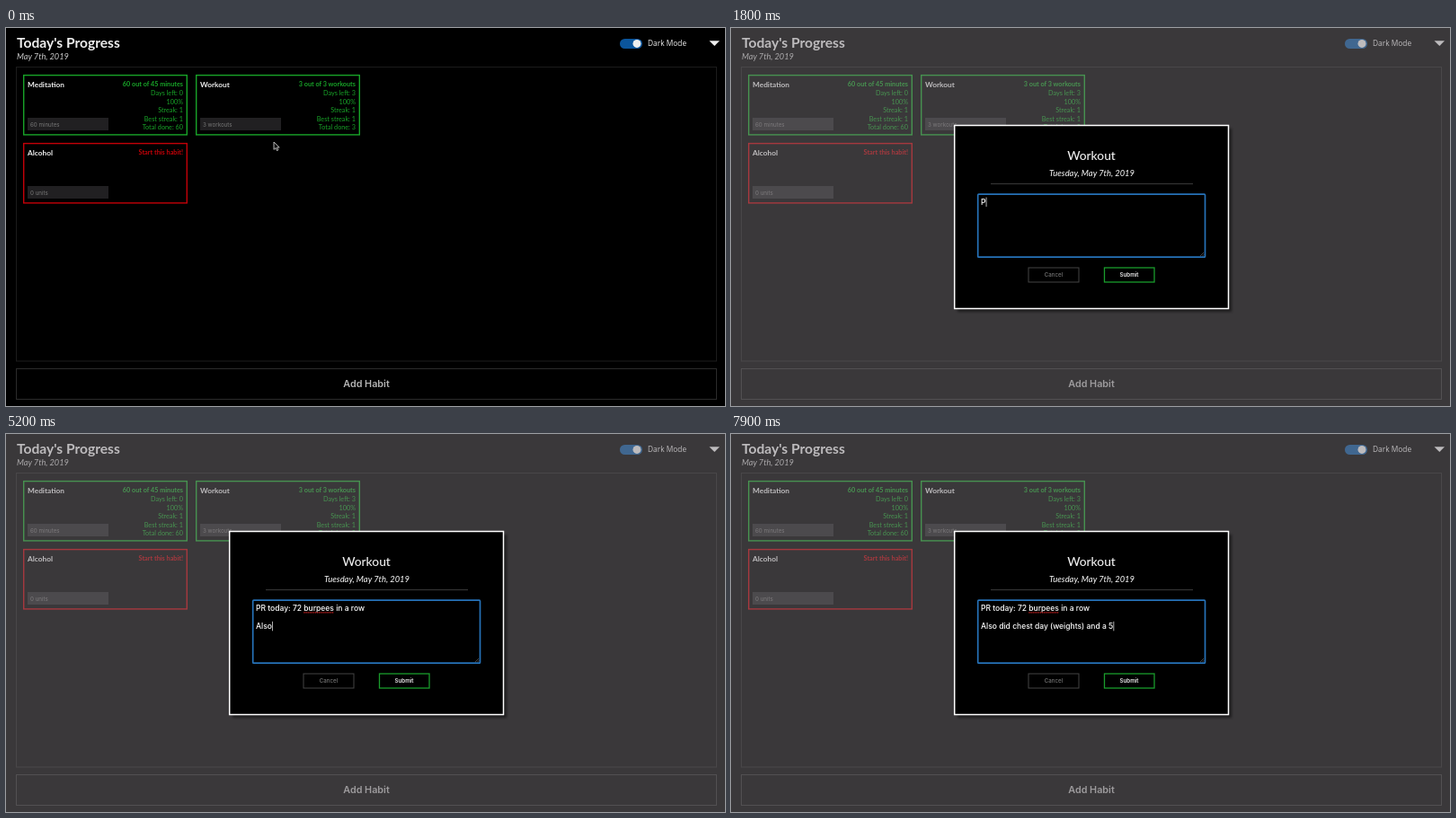
Recreate the animation shown at these times as an HTML page. Size 800 px wide and 421 px high, loop 8000 ms.

```html
<!DOCTYPE html>
<html lang="en">
<head>
<meta charset="utf-8">
<title>Habit tracker</title>
<style>
  html, body { margin: 0; width: 100%; height: 100%; overflow: hidden; background: #000; }
  svg { display: block; width: 800px; height: 421px; }
  text { font-family: Lato, sans-serif; fill: #eee; white-space: pre; }
  rect { fill: none; }
  .ui { font-family: Inter, sans-serif; font-size: 6.2px; }
  .mid { text-anchor: middle; }
  .bold { font-weight: 700; }
  .it { font-style: italic; }
  .name { font-size: 8.3px; font-weight: 700; }
  .stat { font-size: 7.25px; text-anchor: end; }
  .note { font: 500 8.53px Inter, sans-serif; fill: #fff; }
  .frame { stroke: #1c1c1c; }
  .item { fill: #000; stroke: #303030; stroke-width: .8; }
</style>
</head>
<body>
<svg viewBox="0 0 800 421">
  <rect width="800" height="421" style="fill:#000"/>
  <text class="bold" x="12" y="21.5" font-size="15.6">Today's Progress</text>
  <text class="it" x="12" y="35" font-size="9.2" style="fill:#ccc">May 7th, 2019</text>
  <rect x="683" y="12" width="25" height="11" rx="5.5" style="fill:#0b559c"/>
  <circle cx="702" cy="17.4" r="4.5" fill="#eee"/>
  <text x="714" y="20.3" style="font:8.4px 'Open Sans',sans-serif">Dark Mode</text>
  <path d="M782.5 14.3h11.5l-5.7 5.7z" fill="#eee"/>
  <rect class="frame" x="11.5" y="43.5" width="779" height="327.5"/>
  <rect class="frame" x="11.5" y="379.5" width="779" height="34" style="stroke:#2b2b2b"/>
  <text class="mid" x="401" y="400.2" style="font:600 10.8px Inter,sans-serif;fill:#b4b4b4">Add Habit</text>
  <g id="cards"></g>
  <path id="arrow" d="M254 59.5h8.5l-4.2 4.5z" fill="#fff"/>
  <g id="menu"></g>

  <g id="dialog">
    <rect width="800" height="421" style="fill:rgba(128,124,128,.45)"/>
    <g id="modal">
      <rect class="box" x="252" y="4" width="305" style="fill:#000;opacity:.5;filter:blur(1.5px)"/>
      <rect class="box" x="248.7" y=".5" width="304.8" style="fill:#000;stroke:#fff;stroke-width:1.5"/>
      <text class="mid" x="401" y="39" font-size="13.8" font-weight="500">Workout</text>
      <text class="mid it" x="401.5" y="57" font-size="9.4" font-weight="500">Tuesday, May 7th, 2019</text>
      <path d="M289 65.6h225" stroke="#3c3c3c"/>
      <rect x="274.7" y="77.2" width="252.8" height="70" rx="1" style="stroke:#2672b8;stroke-width:1.7"/>
      <path d="M522 146l4-4m-1.500 4l2-2" stroke="#777" stroke-width=".6"/>
      <text id="hint" class="note" x="278" y="89" style="fill:#6b6b6b;font-weight:400">Add a note for today...</text>
      <g id="lines"></g>
      <path id="typo" stroke="#d22" stroke-width="1.1" stroke-dasharray="1.3 .8"/>
      <path id="caret" d="M0 0v10.5" stroke="#ddd" stroke-width=".8"/>
      <g id="buttons">
        <rect x="331" y="159" width="56" height="16" style="stroke:#444"/>
        <text class="ui mid" x="359" y="169.300" style="fill:#888">Cancel</text>
        <rect x="415.5" y="159" width="55.5" height="16" style="stroke:#1a9c2c;stroke-width:1.3"/>
        <text class="ui mid" x="443" y="169.300" font-weight="600">Submit</text>
      </g>
    </g>
  </g>

  <path id="pointer" d="M0 0v8.400l2-1.800 1.400 3 1.500-.7-1.400-2.900h2.700z" fill="#111" stroke="#ddd" stroke-width=".8"/>
  <path id="hand" d="M-.8.5q.9-1.200 1.700 0l.5 3 3.200.8q.9.4.7 1.600l-.8 3.300h-3.800l-3-3.700q0-1.400 1.500-.6l.6.6z" fill="#fff" stroke="#222" stroke-width=".6"/>
</svg>
<script>
const $ = id => document.getElementById(id);
const show = (el, on) => el.setAttribute('display', on ? 'inline' : 'none');
const place = (el, x, y) => el.setAttribute('transform', `translate(${x} ${y})`);

function card(x, y, name, value, color, stats) {
  return `<rect x="${x + .7}" y="${y + .6}" width="181.600" height="66.300" style="stroke:${color};stroke-width:1.4"/>
    <text class="name" x="${x + 5}" y="${y + 13.8}">${name}</text>
    <rect x="${x + 5}" y="${y + 48}" width="90" height="14" style="fill:#212022"/>
    <text class="ui" x="${x + 8}" y="${y + 57.6}" style="fill:#777">${value}</text>` +
    stats.map((s, i) => `<text class="stat ${i ? '' : 'bold'}" x="${x + 178}"
      y="${y + 13.3 + i * 9.6}" style="fill:${color}">${s}</text>`).join('');
}
const stats = (head, left, total) =>
  [head, `Days left: ${left}`, '100%', 'Streak: 1', 'Best streak: 1', `Total done: ${total}`];

$('cards').innerHTML =
  card(19, 52, 'Meditation', '60 minutes', '#18a428', stats('60 out of 45 minutes', 0, 60)) +
  card(211, 52, 'Workout', '3 workouts', '#18a428', stats('3 out of 3 workouts', 3, 3)) +
  card(19, 128, 'Alcohol', '0 units', '#c40008', ['Start this habit!']);

$('menu').innerHTML = ['Suspend', 'Edit Goal', 'Add Note'].map((label, i) =>
  `<rect class="item" x="253.5" y="${66.5 + i * 13}" width="52.500" height="13"/>
   <text class="ui mid" x="279.800" y="${75.2 + i * 13}">${label}</text>`).join('') +
  `<g id="focus"><rect x="253.900" y="92" width="51.800" height="13.500" rx="1.500"
     style="fill:#000;stroke:#2672b8;stroke-width:1.8"/>
   <text class="ui mid bold" x="279.800" y="101.200">Add Note</text></g>`;

$('lines').innerHTML = [0, 1, 2].map(i =>
  `<text class="note" x="278" y="${89 + i * 10.1}"></text>`).join('');
const lines = [...$('lines').children];

const note = 'PR today: 72 burpees in a row\n\nAlso did chest day (weights) and a 5';
const typing = [[1600, 0], [1700, 1], [1800, 1], [2500, 10], [2700, 10], [2800, 12], [3600, 23],
  [4500, 29], [4700, 31], [4900, 31], [5000, 32], [5200, 35], [5800, 39], [6200, 46],
  [6700, 50], [6800, 50], [7700, 65], [7900, 67]];
const mouse = [[0, 298, 127], [100, 298, 127], [500, 259, 62], [700, 259, 62],
  [1000, 285, 92], [1200, 292, 101]];

// Linear interpolation through [time, value] points.
function along(points, t, k = 1) {
  const i = points.findIndex(p => p[0] >= t);
  if (i < 0) return points[points.length - 1][k];
  if (!i) return points[0][k];
  const a = points[i - 1], b = points[i];
  return a[k] + (b[k] - a[k]) * (t - a[0]) / (b[0] - a[0]);
}

function draw(t) {
  const x = along(mouse, t), y = along(mouse, t, 2);
  const open = t >= 1300, menu = t >= 600 && !open;
  const count = Math.floor(along(typing, t) + 1e-6);
  const hand = !open && t >= 500;
  show($('arrow'), !open && y < 120);
  show($('menu'), menu);
  show($('focus'), y > 91);
  show($('dialog'), open);
  show($('pointer'), !hand && !count);
  show($('hand'), hand);
  place($('pointer'), x, y);
  place($('hand'), x, y);
  if (!open) return;

  place($('modal'), 0, count ? 108 : 122);
  document.querySelectorAll('.box').forEach(b => b.setAttribute('height', count ? 204 : 175.5));
  show($('buttons'), count);
  show($('hint'), !count);
  const typed = note.slice(0, count).split('\n');
  lines.forEach((line, i) => line.textContent = typed[i] || '');
  const row = typed.length - 1;
  const width = typed[row] ? lines[row].getComputedTextLength() : 0;
  place($('caret'), 278.6 + width, 80.6 + row * 10.1);
  show($('typo'), count > 20);
  if (count > 20) {
    const start = 278 + lines[0].getSubStringLength(0, 13);
    $('typo').setAttribute('d', `M${start} 90.900h${lines[0].getSubStringLength(13, 7)}`);
  }
}

function tick() {
  draw(Math.floor(performance.now() % 8000 / 100) * 100);
  requestAnimationFrame(tick);
}
tick();
</script>
</body>
</html>
```
